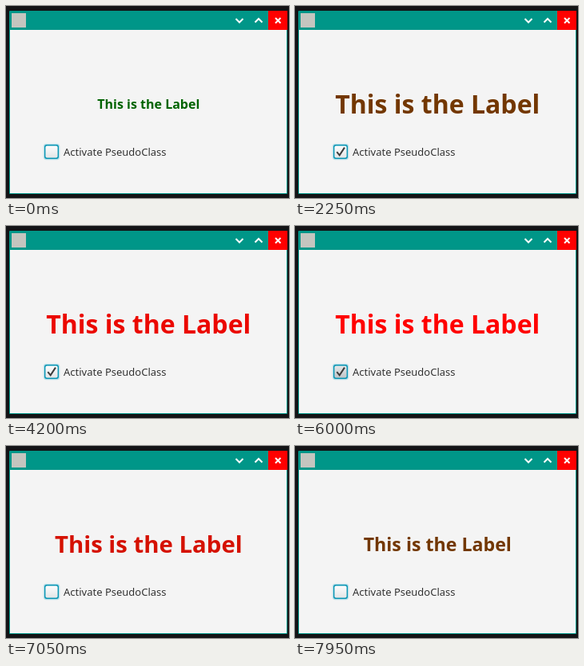
These frames come from a looping animation (354x241 px, 8 s). An HTML page with a canvas:

```html
<!DOCTYPE html>
<html lang="en">
<head>
<meta charset="utf-8">
<title>Label transition</title>
<style>
  html, body { margin: 0; width: 354px; height: 241px; overflow: hidden; background: #131416; }
  canvas { display: block; }
</style>
</head>
<body>
<canvas id="stage" width="354" height="241"></canvas>
<script>
const ctx = document.getElementById('stage').getContext('2d');
const FONT = '"Noto Sans", "Open Sans", sans-serif';
const LOOP = 8000;
const PRESS_ON = 850, CHECK = 900, PRESS_OFF = 6000, UNCHECK = 6350;
const SLOW = 5000, FAST = 500;
const FROM = [0, 100, 0], TO = [255, 0, 0];

const clamp = v => Math.min(1, Math.max(0, v));

// cubic-bezier(.25, .1, .25, 1)
function ease(x) {
  x = clamp(x);
  if (x === 0 || x === 1) return x;
  const curve = (a, b, u) => 3 * a * u * (1 - u) ** 2 + 3 * b * u * u * (1 - u) + u ** 3;
  let lo = 0, hi = 1;
  for (let i = 0; i < 24; i++) {
    const mid = (lo + hi) / 2;
    if (curve(.25, .25, mid) < x) lo = mid; else hi = mid;
  }
  return curve(.1, 1, lo);
}

function state(t) {
  const back = ease((t - UNCHECK) / SLOW);
  return {
    color: ease((t - CHECK) / SLOW) * (1 - back),
    size: ease((t - CHECK) / FAST) * (1 - back),
    checked: t >= CHECK && t < UNCHECK,
    pressed: (t >= PRESS_ON && t < CHECK) || (t >= PRESS_OFF && t < UNCHECK)
  };
}

function rect(color, x, y, w, h) {
  ctx.fillStyle = color;
  ctx.fillRect(x, y, w, h);
}

function rounded(fill, x, y, w, h, r) {
  ctx.fillStyle = fill;
  ctx.beginPath();
  ctx.roundRect(x, y, w, h, r);
  ctx.fill();
}

function line(color, width, ...points) {
  ctx.strokeStyle = color;
  ctx.lineWidth = width;
  ctx.beginPath();
  points.forEach(([x, y], i) => i ? ctx.lineTo(x, y) : ctx.moveTo(x, y));
  ctx.stroke();
}

function drawWindow() {
  rect('#131416', 0, 0, 354, 241);
  rounded('#009688', 4, 6, 348, 230, 1);
  rect('#f4f4f4', 5, 30, 346, 205);
  rect('#ff0000', 328, 6, 24, 24);
  rect('#c4c5bf', 7, 9, 18, 18);
  line('#fff', 2, [287.5, 16], [292, 20.5], [296.5, 16]);
  line('#fff', 2, [311.5, 20.5], [316, 16], [320.5, 20.5]);
  line('#fff', 2, [337, 15], [343.5, 21.5]);
  line('#fff', 2, [343.5, 15], [337, 21.5]);
}

function drawCheckBox({ checked, pressed }) {
  rounded('#b9dfe9', 46.7, 172.7, 20.6, 20.6, 4);
  rounded('#0a96b4', 48, 174, 18, 18, 3);
  const face = ctx.createLinearGradient(0, 175, 0, 191);
  face.addColorStop(0, pressed ? '#e6e8e9' : '#fdfdfd');
  face.addColorStop(1, pressed ? '#bfc4c8' : '#e3e5e6');
  rounded(face, 49.4, 175.4, 15.2, 15.2, 2);
  if (checked) line('#3c3c3c', 2, [52.3, 183.2], [55.7, 187.3], [62, 177.6]);
  ctx.fillStyle = '#333';
  ctx.font = '13px ' + FONT;
  ctx.textAlign = 'left';
  ctx.fillText('Activate PseudoClass', 72, 188);
}

function drawLabel({ color, size }) {
  const px = 16 + 16 * size;
  const rgb = FROM.map((v, i) => Math.round(v + (TO[i] - v) * color));
  ctx.fillStyle = `rgb(${rgb})`;
  ctx.font = `bold ${px}px ${FONT}`;
  ctx.textAlign = 'center';
  ctx.fillText('This is the Label', 178.3, 122.7 + .388 * px);
}

let start;
function frame(now) {
  start ??= now;
  const s = state((now - start) % LOOP);
  drawWindow();
  drawLabel(s);
  drawCheckBox(s);
  requestAnimationFrame(frame);
}
requestAnimationFrame(frame);
</script>
</body>
</html>
```
